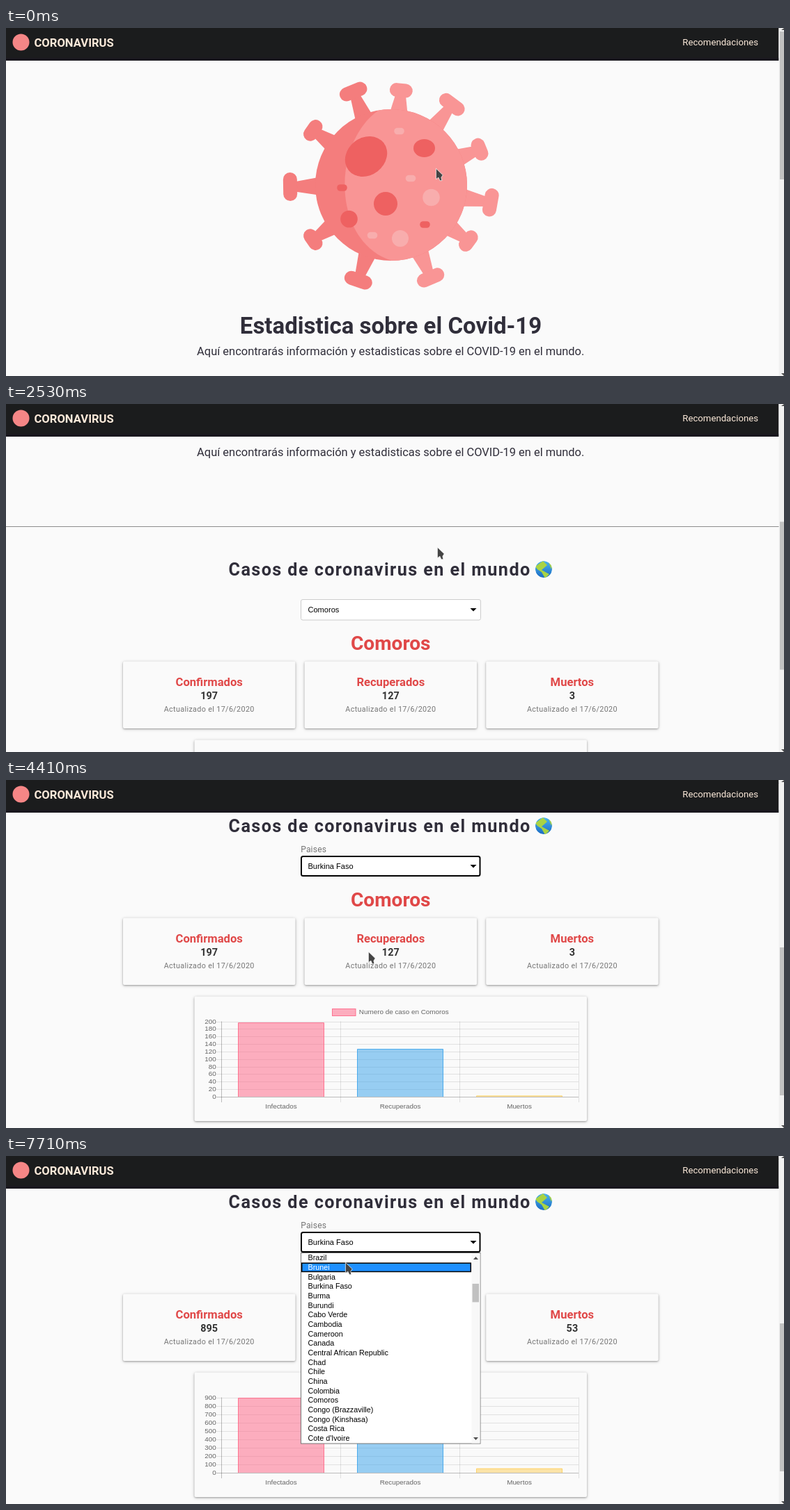
An HTML page for the animation above (8000 ms loop, 1117 px wide and 501 px high).

```html
<!DOCTYPE html>
<html lang="es">
<head>
<meta charset="utf-8">
<title>Estadistica</title>
<style>
html, body { margin: 0; width: 100%; height: 100%; overflow: hidden; background: #fafafa; }
svg { display: block; }
text { font-family: Roboto, sans-serif; fill: #302e3a; }
.mid { text-anchor: middle; }
.end { text-anchor: end; }
.bold { font-weight: 700; }
.title { font-size: 33px; }
.sub { font-size: 16.45px; }
.cases { font-size: 25.2px; letter-spacing: 1.4px; }
.country { font-size: 28.1px; fill: #e04848; }
.head { font-size: 16.6px; fill: #e04848; }
.num { font-size: 14.4px; fill: #333; }
.note { font-size: 10.75px; letter-spacing: .36px; fill: #757575; }
.label { font-size: 12px; letter-spacing: .2px; fill: #757575; }
.brand { font-size: 16.6px; fill: #fbe9d9; }
.nav { font-size: 13.2px; fill: #fbe9d9; }
.field, .item, .axis { font-family: "Liberation Sans", Arial, sans-serif; fill: #000; }
.field { font-size: 11.05px; }
.item { font-size: 10.75px; }
.item.hot { fill: #fff; }
.axis { font-size: 9.9px; fill: #666; }
.card { fill: #fafafa; filter: drop-shadow(0 1px 1px rgba(0,0,0,.25)) drop-shadow(0 1px 2px rgba(0,0,0,.2)); }
</style>
</head>
<body>
<svg width="1117" height="501" viewBox="0 0 1117 501">
  <defs>
    <clipPath id="body"><circle cx="553" cy="226" r="109"/></clipPath>
    <clipPath id="digits"><rect x="160" y="238" width="780" height="20"/></clipPath>
    <clipPath id="rows"><rect x="424" y="139.5" width="257" height="274.5"/></clipPath>
    <clipPath id="disc"><circle cx="772" cy="66" r="12"/></clipPath>
    <linearGradient id="sea" x2="0" y2="1">
      <stop offset="0" stop-color="#4bb4ee"/><stop offset="1" stop-color="#1b6cc4"/>
    </linearGradient>
  </defs>
  <g id="page">
    <g id="virus"></g>
    <text class="mid bold title" x="552.5" y="440">Estadistica sobre el Covid-19</text>
    <text class="mid sub" x="552.2" y="471">Aquí encontrarás información y estadisticas sobre el COVID-19 en el mundo.</text>
    <g transform="translate(0 568)">
      <path d="M0 4.5H1110" stroke="#8c8c8c"/>
      <text class="bold cases" x="319.5" y="75">Casos de coronavirus en el mundo</text>
      <g clip-path="url(#disc)">
        <circle cx="772" cy="66" r="12" fill="url(#sea)"/>
        <path d="M760 62L771 54 777 60 769 67 780 73 774 79 769 70 763 66ZM779 56L784 61 783 66Z" fill="#a9d344"/>
      </g>
      <g id="cards"></g>
      <g id="live"></g>
    </g>
  </g>
  <rect width="1109.5" height="47" fill="#1b1c1d"/>
  <rect y="43" width="1109.5" height="4" fill="#19171e"/>
  <circle cx="21.5" cy="20.5" r="12" fill="#f58686"/>
  <text class="bold brand" x="40.5" y="26.5">CORONAVIRUS</text>
  <text class="nav" x="971.3" y="25">Recomendaciones</text>
  <rect x="1109.5" width="7.5" height="501" fill="#f1f1f1"/>
  <rect id="thumb" x="1111" width="6" height="213" fill="#c1c1c1"/>
  <path d="M1113 497H1117V501ZM1113 3L1117 0V3Z" fill="#505050"/>
  <g id="popup"></g>
  <path id="cursor" d="M0 0V15.5L3.5 13 5.5 17.5H8.5L7.5 13 9.8 9.5Z" fill="#444" stroke="#fff" stroke-width=".7"/>
</svg>
<script>
const TICKS = 136, FPS = 17, ROW = 13.66, TOP = 139.7;
// Ticks at which things happen
const FOCUS = 55, OPEN = 57, LABEL = 62, PICK = 66, UPDATE = 78, REOPEN = 94;

const $ = id => document.getElementById(id);
const text = (cls, x, y, s) => `<text class="${cls}" x="${x}" y="${y}">${s}</text>`;
const clamp = v => Math.max(0, Math.min(1, v));
const easeOut = (n, start, length, power) => 1 - (1 - clamp((n - start) / length)) ** power;

const stats = [
  { head: "Confirmados", label: "Infectados", rgb: "255,99,132", from: 197, to: 895 },
  { head: "Recuperados", label: "Recuperados", rgb: "54,162,235", from: 127, to: 804 },
  { head: "Muertos", label: "Muertos", rgb: "255,206,86", from: 3, to: 53 }];
const cardX = i => 291.7 + i * 260.6;

const countries = ("Armenia,Australia,Austria,Azerbaijan,Bahamas,Bahrain,Bangladesh,Barbados,Belarus,Belgium,Belize,Benin," +
  "Bhutan,Bolivia,Bosnia and Herzegovina,Botswana,Brazil,Brunei,Bulgaria,Burkina Faso,Burma,Burundi,Cabo Verde," +
  "Cambodia,Cameroon,Canada,Central African Republic,Chad,Chile,China,Colombia,Comoros,Congo (Brazzaville)," +
  "Congo (Kinshasa),Costa Rica,Cote d'Ivoire").split(",");

// Rests: [first tick, last tick, values...]; values ease from one rest to the next
const scrollRests = [[0, 15, 0], [22, 29, 131], [31, 42.5, 393], [49, TICKS, 568]];
const listRests = [[0, 107, 0], [111, TICKS, 16]];
const cursorRests = [
  [0, 4, 618, 203], [5, 50, 620, 207], [FOCUS, OPEN, 505, 120], [LABEL, 82, 521, 248], [92, 96, 545, 125],
  [105, 114, 538, 279], [118, 124, 487, 162], [125, 129, 488, 157], [131, TICKS, 488, 154]];

function at(rests, n) {
  const i = rests.findIndex(r => r[1] >= n), b = rests[i];
  if (n >= b[0]) return b.slice(2);
  const a = rests[i - 1], p = (n - a[1]) / (b[0] - a[1]), e = p * p * (3 - 2 * p);
  return a.slice(2).map((v, j) => v + (b[j + 2] - v) * e);
}

function drawVirus() {
  const dark = "#f47d7d", light = "#f99595";
  // Spikes stand at clockwise angles from the top, long and short by turns
  const spikes = [6, 37, 68, 100, 126, 157, 199, 235, 269, 305, 338].map((angle, i) => {
    const right = i < 6, short = right === (i % 2 === 0);
    const r = short ? 137 : 145, half = short ? 6.5 : 10.5, color = right ? light : dark;
    return `<g transform="translate(553 226) rotate(${angle})" fill="${color}">
      <path d="M-6 ${-r}H6L13-103H-13Z"/>
      <path d="M${-half} ${-r}H${half}" stroke="${color}" stroke-width="20" stroke-linecap="round"/></g>`;
  });
  const dot = (x, y, rx, ry) => `<rect x="${x - rx}" y="${y - ry}" width="${2 * rx}" height="${2 * ry}" rx="${rx > 10 ? rx : ry}" ry="${ry}"/>`;
  const disc = (x, y, r) => dot(x, y, r, r), pill = (x, y) => dot(x, y, 7.3, 4.8);
  $("virus").innerHTML = spikes.join("") + `<g clip-path="url(#body)">
    <path d="M440 110H670V340H440Z" fill="${dark}"/>
    <path d="M537 117C465 165 468 312 557 336H670V110Z" fill="${light}"/></g>
    <g fill="#ee6161"><ellipse cx="517" cy="185" rx="32" ry="27" transform="rotate(-38 517 185)"/>
    ${dot(600.5, 173, 15.5, 13)}${disc(545, 253, 17)}${disc(492.5, 275, 12.3)}${pill(482.5, 230)}${pill(601.5, 283)}</g>
    <g fill="#f8adad">${disc(610.5, 244, 12.3)}${disc(566, 303, 12)}${pill(564.5, 148.5)}${pill(581, 216.5)}${pill(526, 298.5)}</g>`;
}

const card = (x, y, w, h) => `<rect class="card" x="${x}" y="${y}" width="${w}" height="${h}" rx="2"/>`;

function drawCards() {
  $("cards").innerHTML = stats.map(({ head }, i) =>
    card(cardX(i) - 123.7, 198.5, 247.5, 96.5) + text("mid bold head", cardX(i), 234, head) +
    text("mid note", cardX(i), 270.5, "Actualizado el 17/6/2020")
  ).join("") + card(270.5, 311.5, 563.5, 179.5);
}

// Rolling counter: each digit turns through whole steps, the last of three a full round more
function counter({ from, to }, cx, n) {
  const e = easeOut(n, UPDATE - 1, 35, 2.5);
  const digits = [...String(e ? to : from)], old = String(from).padStart(digits.length, "0");
  return digits.map((d, i) => {
    const turn = ((d - old[i] + 9) % 10) + 1 + (i === 2 ? 10 : 0);
    const v = +old[i] + turn * e, whole = Math.floor(v), y = 253 - (v - whole) * 21;
    const x = cx + (i - (digits.length - 1) / 2) * 8.3;
    return text("mid bold num", x, y, whole % 10) + text("mid bold num", x, y + 21, (whole + 1) % 10);
  }).join("");
}

function chart(n, name) {
  const updated = n >= UPDATE, max = updated ? 900 : 200, step = updated ? 100 : 20;
  const left = 309.5, width = 171, base = 456, height = 108.5, e = easeOut(n, UPDATE - 1, 15, 4);
  const paint = rgb => `fill="rgba(${rgb},.5)" stroke="rgb(${rgb})" stroke-opacity=".85"`;
  let grid = "", out = "";
  for (let v = 0; v <= max; v += step) {
    const y = base - v / max * height;
    if (v) grid += `M302 ${Math.round(y) + .5}H822`;
    out += text("axis end", 301.7, y + 3, v);
  }
  stats.forEach(({ label, rgb, from, to }, i) => {
    const x = left + (i + .5) * width, y = base + .5 - height * (from / 200 * (1 - e) + to / 900 * e);
    grid += `M${left + (i + 1) * width} 347.5V464`;
    out += `<path d="M${x - 61.5} ${base}V${y}H${x + 61.5}V${base}" ${paint(rgb)}/>` + text("axis mid", x, 473, label);
  });
  return `<path d="${grid}" stroke="#000" stroke-opacity=".1"/>
    <path d="M302 456.5H822M${left} 347.5V464" stroke="#000" stroke-opacity=".25"/>` + out +
    `<rect x="${updated ? 459.5 : 468.5}" y="329.5" width="33.5" height="10" ${paint(stats[0].rgb)}/>` +
    text("axis mid", 571.3, 337, "Numero de caso en " + name);
}

function select(n) {
  const [x, y, w, h, line] = n >= FOCUS ? [424, 110, 256.5, 28, "#000"] : [423.5, 109.5, 258, 29.5, "#ccc"];
  return `<rect x="${x}" y="${y}" width="${w}" height="${h}" rx="2.5" fill="#fff" stroke="${line}" stroke-width="${n >= FOCUS ? 2 : 1}"/>
    <path d="M666.5 122H675.5L671 126.5Z"/>` +
    text("field", 433.5, 128, n < PICK ? "Comoros" : "Burkina Faso") + (n >= LABEL ? text("label", 423.2, 104, "Paises") : "");
}

function popup(n, y) {
  const reopened = n >= REOPEN;
  const alpha = reopened || n < PICK ? clamp((n + 1 - (reopened ? REOPEN : OPEN)) / 2) : 1 - easeOut(n, PICK - 1, 10, 3);
  if (!alpha) return "";
  const first = reopened ? at(listRests, n)[0] : 12;
  const hot = y > TOP ? Math.floor((y - TOP) / ROW + first) : countries.indexOf(reopened ? "Burkina Faso" : "Comoros");
  const rows = countries.map((name, i) => {
    const top = TOP + (i - first) * ROW, on = i === hot;
    return (on ? `<rect x="424.7" y="${Math.ceil(top) + .2}" width="242.6" height="12.3" fill="#1e90ff" stroke="#000" stroke-width="1.5"/>` : "") +
      text(on ? "item hot" : "item", 433.5, Math.round(top + 10.6), name);
  });
  return `<g opacity="${alpha}"><rect x="423.5" y="139.5" width="257.5" height="274.5" fill="#fff" stroke="#767676"/>
    <g clip-path="url(#rows)">${rows.join("")}</g>
    <rect x="668.5" y="140" width="12" height="273.5" fill="#f8f8f8"/>
    <rect x="669.5" y="${162.3 + first * 1.35}" width="9.5" height="26.5" fill="#c1c1c1"/>
    <path d="M671 149L674.5 145 678 149ZM671 405L674.5 409 678 405Z" fill="#505050"/></g>`;
}

function draw(n) {
  const [scroll] = at(scrollRests, n), [x, y] = at(cursorRests, n);
  const name = n >= UPDATE ? "Burkina Faso" : "Comoros";
  $("page").setAttribute("transform", `translate(0 ${-Math.round(scroll)})`);
  $("thumb").setAttribute("y", 5 + scroll * .4155);
  $("cursor").setAttribute("transform", `translate(${x - .6} ${y - .8})`);
  $("live").innerHTML = select(n) + text("mid bold country", 552.2, 182, name) +
    `<g clip-path="url(#digits)">${stats.map((s, i) => counter(s, cardX(i), n)).join("")}</g>` + chart(n, name);
  $("popup").innerHTML = popup(n, y);
}

let last = -1;
function loop() {
  const n = Math.floor((performance.now() % 8000 + 7) / 1000 * FPS) % TICKS;
  if (n !== last) draw(last = n);
  requestAnimationFrame(loop);
}
drawVirus();
drawCards();
loop();
</script>
</body>
</html>
```
